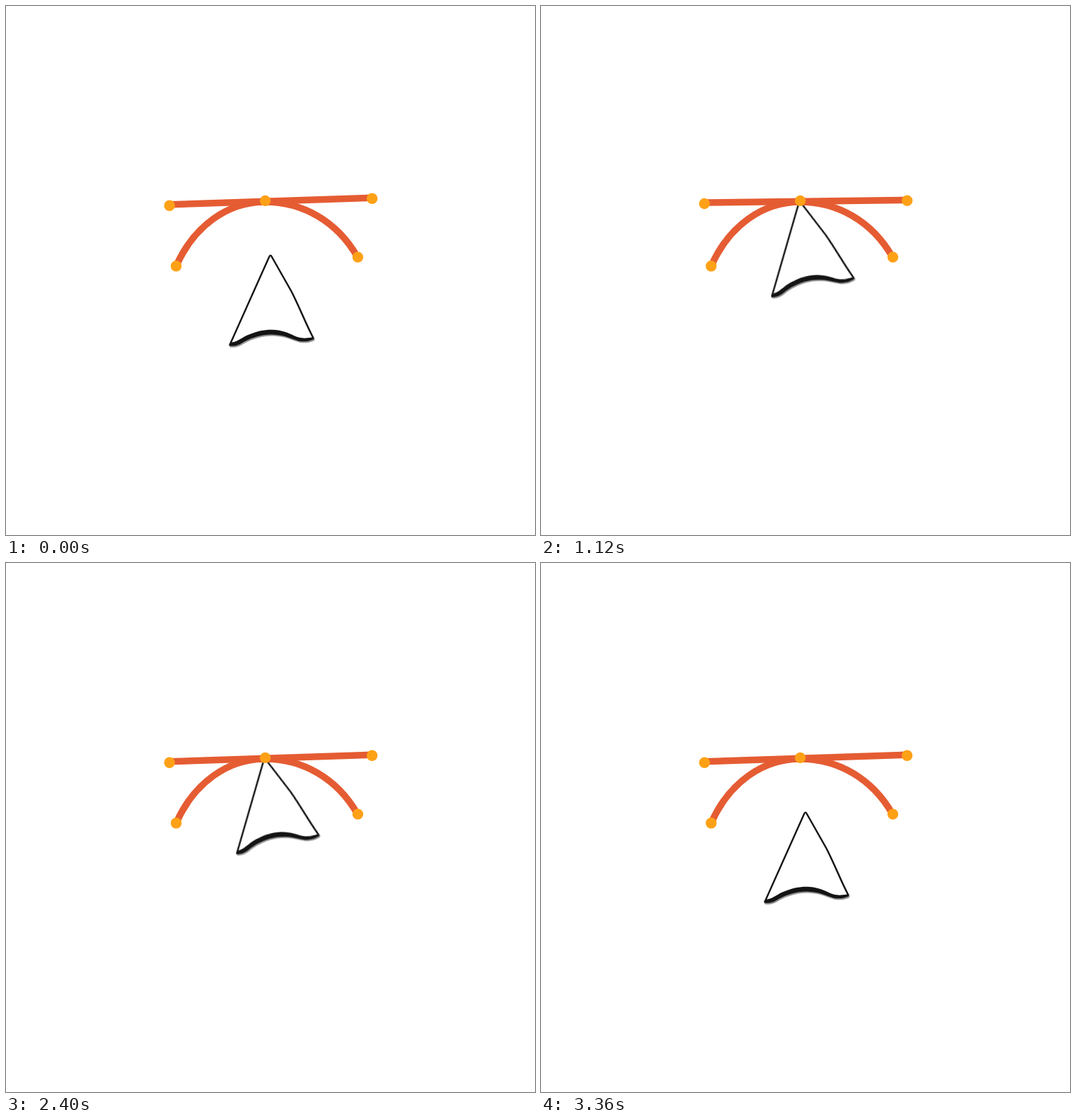
Animation, 748 px wide and 748 px high, one loop 4800 ms. Source, as an HTML page:

```html
<!DOCTYPE html>
<html lang="en">
<head>
<meta charset="utf-8">
<title>Pen point</title>
<style>
  html, body { margin: 0; width: 100%; height: 100%; overflow: hidden; background: #fff; }
  svg { display: block; width: 100%; height: 100%; }
  .line { fill: none; stroke: #e55c33; stroke-width: 9.5; }
  .dot { fill: #fea116; }
  #pointer { filter: drop-shadow(1.5px 2px .7px rgba(0, 0, 0, .42)); }
  .body { fill: #fff; stroke: #141414; stroke-width: 2.4; stroke-linejoin: round; }
  .base { fill: #141414; }
</style>
</head>
<body>
<svg viewBox="0 0 748 748">
  <!-- The pointer is drawn around its tip -->
  <g id="pointer">
    <path class="body" d="M0 .6 Q-1 .6 -2 3 L-57.5 127 C-40 127 -30 110 2 109.500 C30 110 35 123 60.500 117.500 C50 98 42 76 29.500 51.500 L2 3 Q1 .6 0 .6 Z"/>
    <path class="base" d="M-57 124 C-48 123.500 -42 118 -34 114 C-20 108 -10 105.800 2 105.800 C15 106 25 110 34 114.500 C43 119 49 118.500 61 116.500 L60.500 119.500 C53 122.500 47 122.800 40 121.800 C30 119 20 113 2 112.600 C-14 112.800 -26 117 -37 122.500 C-45 128 -51 129.500 -58.500 128.500 Z"/>
  </g>
  <path class="line" d="M241 367 C266 311 313 277 366.500 277 C419 277 468 304 497 355"/>
  <g id="handle">
    <path class="line" d="M231.500 280.800 L517.500 271.300"/>
    <circle class="dot" cx="231.200" cy="282.200" r="7.700"/>
    <circle class="dot" cx="517.700" cy="272.200" r="7.700"/>
  </g>
  <circle class="dot" cx="240.600" cy="367.700" r="7.700"/>
  <circle class="dot" cx="366.600" cy="275.400" r="7.700"/>
  <circle class="dot" cx="497.500" cy="355.100" r="7.700"/>
</svg>
<script>
  const LOOP = 4800, TICK = 40;
  const pointer = document.getElementById('pointer');
  const handle = document.getElementById('handle');

  const ease = p => (1 - Math.cos(Math.PI * p)) / 2;
  const ramp = (t, from, to) => ease(Math.min(1, Math.max(0, (t - from) / (to - from))));
  // Goes from 0 to 1, waits, and comes back.
  const trip = (t, out, arrive, leave, home) => ramp(t, out, arrive) - ramp(t, leave, home);

  function draw(t) {
    const move = trip(t, 0, 960, 2400, 3360);
    const tilt = trip(t, 960, 1680, 1680, 2400);
    pointer.setAttribute('transform',
      `translate(${374 - 8.2 * move} ${352 - 75.6 * move}) rotate(${-8 * move})`);
    handle.setAttribute('transform', `rotate(${10 * tilt} 366.6 275.4)`);
  }

  const start = performance.now();
  function frame() {
    const t = (performance.now() - start + 6) % LOOP;
    draw(Math.floor(t / TICK) * TICK);
    requestAnimationFrame(frame);
  }
  frame();
</script>
</body>
</html>
```
